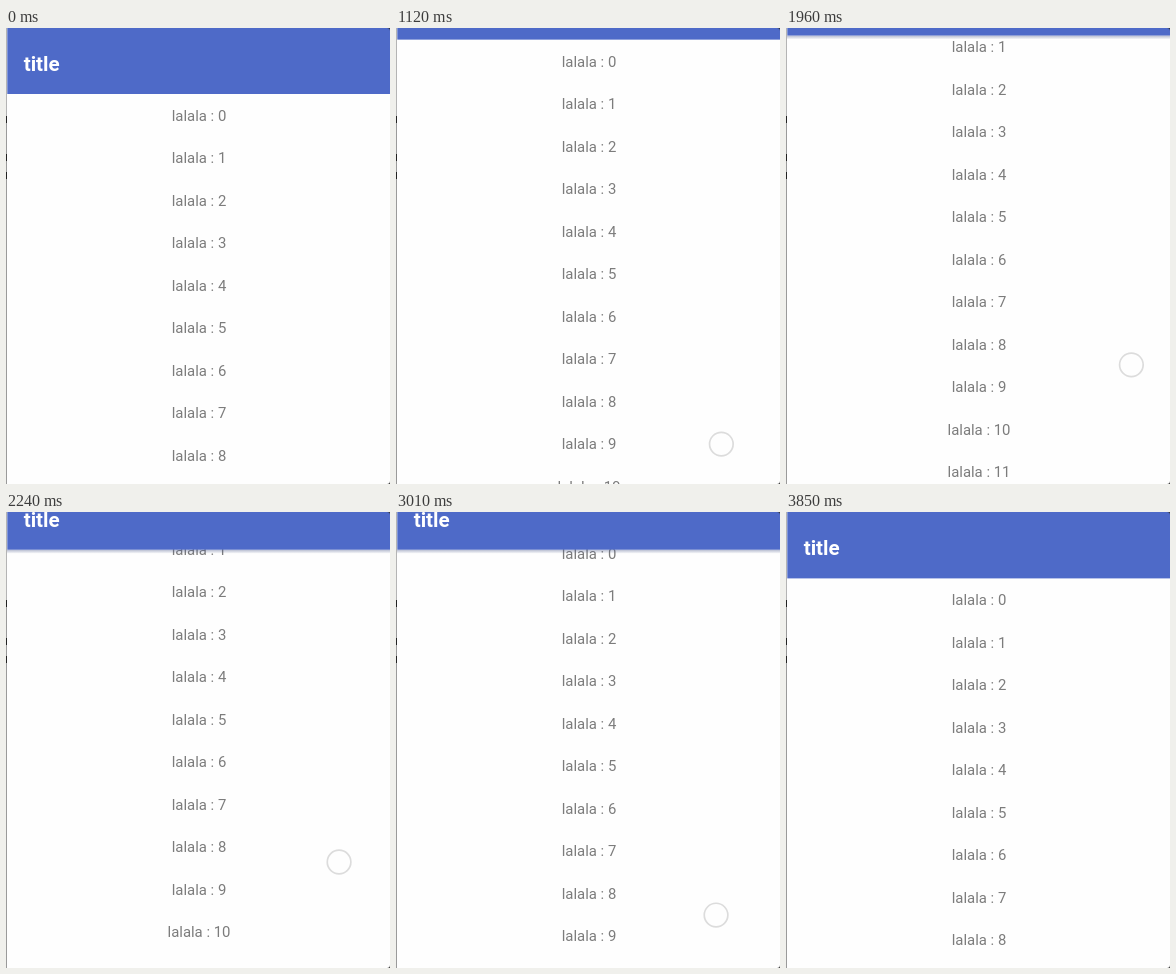
An HTML page with a canvas that plays this animation: 384x456 px, repeating every 4620 ms.

```html
<!DOCTYPE html>
<html lang="en">
<head>
<meta charset="utf-8">
<title>Collapsing toolbar</title>
<style>
html, body { margin: 0; width: 100%; height: 100%; overflow: hidden; background: #fefefe; }
canvas { display: block; }
</style>
</head>
<body>
<canvas id="stage" width="384" height="456"></canvas>
<script>
const W = 384, H = 456, LOOP = 4620, STEP = 70;
const BAR = 66.4, PINNED = 28.7, ROW = 42.5, FIRST = 93.3;
const PRESS = 910, TURN = 1890, SLOW = 3010, REST = 3850, LIFT = 3780;
const TOP_SCROLL = 116.5, MID_SCROLL = 46.7;
const ctx = document.getElementById('stage').getContext('2d');

const mix = (a, b, p) => a + (b - a) * p;
const ramp = (t, from, to) => Math.min(1, Math.max(0, (t - from) / (to - from)));

// A steady push up, a slow drag back, then easing to rest.
function scrollAt(t) {
  if (t < PRESS) return 0.4;
  if (t <= TURN) return Math.min(TOP_SCROLL, 17.4 + 0.178 * (t - PRESS));
  if (t <= SLOW) return mix(TOP_SCROLL, MID_SCROLL, ramp(t, TURN, SLOW) ** 0.94);
  return MID_SCROLL * (1 - ramp(t, SLOW, REST)) ** 1.96;
}

// The bar leaves with the list, returns part way, then waits for the list top.
function barOffset(t, scroll) {
  const limit = t <= TURN ? BAR + 6 : mix(BAR, PINNED, ramp(t, TURN, TURN + 350));
  return Math.min(scroll, limit);
}

function touchAt(t) {
  if (t <= TURN) {
    const p = ramp(t, PRESS, 1547);
    return [mix(321, 349, p ** 1.68), mix(456, 335, p)];
  }
  const p = ramp(t, TURN, LIFT);
  return [349 - 57.7 * p - 5.3 * Math.sin(7.71 * p), mix(335, 469.4, p ** 1.3)];
}

function rect(color, x, y, w, h) {
  ctx.fillStyle = color;
  ctx.fillRect(x, y, w, h);
}

function text(str, x, y, font, color, align) {
  ctx.font = font + ' Roboto, sans-serif';
  ctx.fillStyle = color;
  ctx.textAlign = align;
  ctx.fillText(str, x, y);
}

function drawList(scroll) {
  const first = Math.max(0, Math.floor((scroll - FIRST) / ROW));
  for (let i = first; i < first + 13; i++) {
    text('lalala : ' + i, 193, FIRST + i * ROW - scroll, '14.9px', '#7c7c7c', 'center');
  }
}

function drawBar(offset, raised) {
  const bottom = BAR - offset;
  if (bottom <= 0) return;
  if (raised) {
    const g = ctx.createLinearGradient(0, bottom, 0, bottom + 4);
    g.addColorStop(0, 'rgba(70,85,135,.4)');
    g.addColorStop(1, 'rgba(70,85,135,0)');
    rect(g, 1, bottom, W - 1, 4);
  }
  rect('#4e6ac8', 1.3, 0, W, bottom);
  text('title', 17.7, 43.4 - offset, '700 20.6px', '#fff', 'left');
}

function drawTouch(t) {
  if (t < PRESS || t >= LIFT) return;
  ctx.beginPath();
  ctx.arc(...touchAt(t), 11.8, 0, Math.PI * 2);
  ctx.strokeStyle = '#dcdcdc';
  ctx.lineWidth = 1.7;
  ctx.stroke();
}

function corner(y, dir) {
  ctx.beginPath();
  ctx.moveTo(W, y);
  ctx.lineTo(W - 3, y);
  ctx.quadraticCurveTo(W, y, W, y + 3 * dir);
  ctx.fillStyle = '#333';
  ctx.fill();
}

function drawEdges() {
  rect('#b4b4b4', 0, 0, 1, 88);
  rect('#9a9a9a', 0, 88, 1, H - 88);
  for (const y of [88, 126, 144]) rect('#222', 0, y, 1, 7);
  corner(0, 1);
  corner(H, -1);
}

function draw(now) {
  const t = Math.floor((now % LOOP) / STEP) * STEP;
  const scroll = scrollAt(t);
  const offset = barOffset(t, scroll);
  rect('#fefefe', 0, 0, W, H);
  drawList(scroll);
  drawBar(offset, scroll - offset > 0.5);
  drawTouch(t);
  drawEdges();
}

const start = performance.now();
function tick() {
  draw(performance.now() - start);
  requestAnimationFrame(tick);
}
tick();
</script>
</body>
</html>
```
